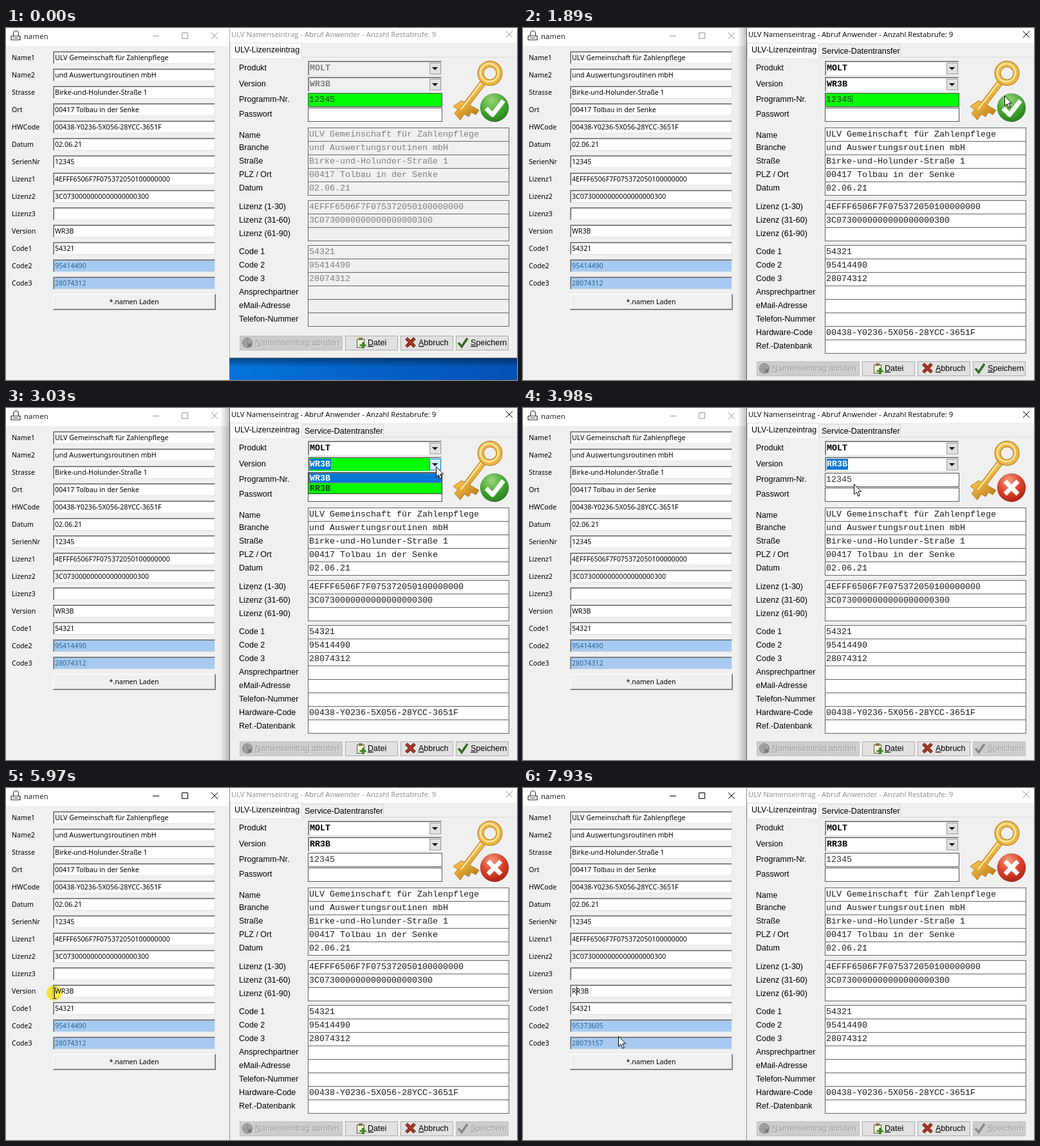
Recreate the animation shown at these times as an HTML page. Size 794 by 548 pixels, loop 8 s.

```html
<!DOCTYPE html>
<html lang="de">
<head>
<meta charset="utf-8">
<title>Lizenzeintrag</title>
<style>
html, body { margin: 0; width: 100%; height: 100%; overflow: hidden; background: #f0f0f0; }
svg { display: block; width: 794px; height: 548px; }
rect, .line { shape-rendering: crispEdges; }
text { white-space: pre; }
.small { font: 10.6px "Noto Sans", sans-serif; }
.title { font: 11.3px "Open Sans", sans-serif; }
.label { font: 12.5px "Liberation Sans", sans-serif; }
.mono { font: 13.333px "Liberation Mono", monospace; }
.bold { font-weight: bold; }
.u { text-decoration: underline; }
.cell { fill: #fff; stroke: #646464; }
.combo { fill: #fff; }
.locked .cell, .locked .combo { fill: #f0f0f0; }
.locked .val { fill: #808080; }
.back .cap { fill: #8c8c8c; }
.back .ctl { stroke: #999; }
.ctl { stroke: #000; fill: none; }
#halo { mix-blend-mode: multiply; }
</style>
</head>
<body>
<svg id="stage" viewBox="0 0 794 548">
  <defs>
    <linearGradient id="desk"><stop stop-color="#0474da"/><stop offset="1" stop-color="#0551b4"/></linearGradient>
    <linearGradient id="drop" x2="0" y2="1"><stop stop-color="#000" stop-opacity=".4"/><stop offset="1" stop-opacity="0"/></linearGradient>
    <linearGradient id="side"><stop stop-color="#000" stop-opacity="0"/><stop offset="1" stop-color="#000" stop-opacity=".24"/></linearGradient>
    <linearGradient id="gold" gradientUnits="userSpaceOnUse" x1="715" y1="70" x2="755" y2="120"><stop stop-color="#ffe9a0"/><stop offset=".5" stop-color="#f0b840"/><stop offset="1" stop-color="#b97a18"/></linearGradient>
    <radialGradient id="green" cx=".4" cy=".25" r=".8"><stop stop-color="#9bd67c"/><stop offset=".55" stop-color="#45a932"/><stop offset="1" stop-color="#237a1c"/></radialGradient>
    <radialGradient id="red" cx=".4" cy=".25" r=".8"><stop stop-color="#f49a80"/><stop offset=".55" stop-color="#dc4028"/><stop offset="1" stop-color="#ac2014"/></radialGradient>
  </defs>
</svg>
<script>
const LOOP = 8000;
const ACTIVATE = 1420, UNLOCK = 1760, OPEN = 2800, HOVER = 3300, CLOSE = 3840,
      PICK = 3980, SWITCH = 5800, MARK = 5980, TYPE = 7450;

const rect = (x, y, w, h, fill, more = '') =>
  `<rect x="${x}" y="${y}" width="${w}" height="${h}" fill="${fill}" ${more}/>`;
const path = (d, stroke, width = 1, more = '') =>
  `<path d="${d}" fill="none" stroke="${stroke}" stroke-width="${width}" ${more}/>`;
const text = (x, y, s, cls, fill = '#000', more = '') =>
  `<text x="${x}" y="${y}" class="${cls}" fill="${fill}" ${more}>${s}</text>`;
// Content shown only from one time to another, pairs of ms
const on = (times, body) => `<g data-on="${times.join(' ')}">${body}</g>`;
const box = (x, y, w, h, fill, stroke, more = '') =>
  rect(x + .5, y + .5, w - 1, h - 1, fill, `stroke="${stroke}" ${more}`);

function sunken(x, y, w, h, fill, cls = '') {
  return rect(x, y, w, h, fill, `class="${cls}"`) +
    path(`M${x + .5} ${y + h}V${y + .5}H${x + w}`, '#a0a0a0', 1, 'class="line"') +
    path(`M${x + 1.5} ${y + h - 1}V${y + 1.5}H${x + w - 1}`, '#696969', 1, 'class="line"') +
    path(`M${x + 1} ${y + h - .5}H${x + w - .5}V${y + 1}`, '#e3e3e3', 1, 'class="line"');
}

const firm = 'ULV Gemeinschaft für Zahlenpflege';
const unit = 'und Auswertungsroutinen mbH';
const street = 'Birke-und-Holunder-Straße 1';
const town = '00417 Tolbau in der Senke';
const hardware = '00438-Y0236-5X056-28YCC-3651F';
const lic1 = '4EFFF6506F7F075372050100000000', lic2 = '3C0730000000000000000300';

function leftWindow() {
  const rows = [['Name1', firm], ['Name2', unit], ['Strasse', street], ['Ort', town],
    ['HWCode', hardware], ['Datum', '02.06.21'], ['SerienNr', '12345'], ['Lizenz1', lic1],
    ['Lizenz2', lic2], ['Lizenz3', ''], ['Version', ['WR3B', 'RR3B']], ['Code1', '54321'],
    ['Code2', ['95414490', '95373605']], ['Code3', ['28074312', '28073157']]];
  let s = rect(0, 0, 347, 548, '#f0f0f0') + rect(0, 0, 347, 28, '#fff') +
    path('M11.5 12V8.500a4 4 0 0 1 8 0V12M8 12.500H22V18.500H8ZM11 15.500H19', '#333', 1.2) +
    text(28, 17, 'namen', 'title', '#111', 'letter-spacing=".15"') +
    '<g id="leftCtl">' + path('M228 12.5H238M273.500 7.500H282.500V16.500H273.500ZM319 7L329 17M329 7L319 17', '#000', 1, 'class="ctl"') + '</g>';
  rows.forEach(([name, value], i) => {
    const y = 36 + 27 * i, code = i > 11, ink = code ? '#2b6496' : '#000';
    s += text(9, y + 14, name, 'small') + sunken(73, y, 252, 20, code ? '#a6caf0' : '#fff');
    const put = v => text(76, y + 14, v, 'small', ink);
    s += Array.isArray(value)
      ? on([0, TYPE], put(value[0])) + on([TYPE, LOOP], put(value[1])) : put(value);
  });
  s += on([MARK, TYPE], rect(76, 309, 11, 14, '#0078d7') + text(76, 320, 'W', 'small', '#fff'));
  s += on([7180, TYPE], rect(76, 309, 1, 14, '#ff8728'));
  s += on([TYPE, 7980], rect(83, 309, 1, 14, '#000'));
  s += rect(73, 414, 253, 25, '#f0f0f0') +
    path('M73.500 438V414.500H325', '#fff', 1, 'class="line"') +
    path('M73 438.500H325.500V414', '#696969', 1, 'class="line"') +
    path('M74 437.500H324.500V415', '#a0a0a0', 1, 'class="line"') +
    text(199, 430, '*.namen Laden', 'small', '#000', 'text-anchor="middle"');
  return s;
}

function cells(top, rows) {
  return rows.map(([name, value], i) => {
    const y = top + 21 * i;
    return text(362, y + (y === 155 ? 16 : 14), name, 'label') +
      rect(469.5, y + .5, 312, 21, '#fff', 'class="cell"') +
      text(471, y + 14, value || '', 'mono val', '#1c1c1c');
  }).join('');
}

function arrowButton(y, hot) {
  return box(658, y, 18, 18, hot ? '#d9ecfb' : '#e1e1e1', hot ? '#0078d7' : '#9a9a9a') +
    `<path d="M662 ${y + 7}H671L666.500 ${y + 11.5}Z"/>`;
}

function keyIcon() {
  const badge = (fill, mark) => `<circle cx="759" cy="124" r="22" fill="url(#${fill})" stroke="#0003"/>` +
    path(mark, '#fff', 7, 'stroke-linejoin="round"');
  return path('M742 84L704 134', '#b07a24', 10) +
    '<path d="M695 122L708 113 735 128 730 135 723 131 719 138 712 134 706 143 697 133 702 127Z" fill="url(#gold)" stroke="#b07a24"/>' +
    path('M742 84L705 133', 'url(#gold)', 8) + path('M738 86L707 127', '#fff0b8', 2) +
    '<circle cx="752" cy="70.500" r="14.500" fill="none" stroke="#b07a24" stroke-width="10"/>' +
    '<circle cx="752" cy="70.500" r="14.500" fill="none" stroke="#eeb746" stroke-width="8"/>' +
    '<circle cx="751" cy="69.500" r="14" fill="none" stroke="#ffe8a0" stroke-width="2.500"/>' +
    on([0, PICK], badge('green', 'M746 125L756 135 773 113')) +
    on([PICK, LOOP], badge('red', 'M749 114L769 134M769 114L749 134'));
}

function buttons() {
  const button = (x, w, tx, s, off) =>
    box(x, 479, w, 23, off ? '#cccccc' : '#e1e1e1', off ? '#bfbfbf' : '#adadad') +
    (off ? text(tx + 1, 495, s, 'label', '#eee') : '') +
    text(tx, 494, s, 'label', off ? '#999' : '#000');
  const key = s => `<tspan class="u">${s[0]}</tspan>${s.slice(1)}`;
  const tick = color => path('M703 490L708 496 717 483', color, 3.500);
  return button(363, 160, 387, key('Namenseintrag abrufen'), true) +
    '<circle cx="375" cy="490" r="7.500" fill="#aaa" stroke="#777"/>' +
    path('M368 490H382M375 483V497M370 486Q375 489 380 486M370 494Q375 491 380 494', '#888') +
    '<circle cx="379" cy="494" r="3" fill="#777"/>' +
    button(527, 82, 562, key('Datei')) +
    box(545, 484, 12, 14, '#f8f5dc', '#5c5238') + rect(548, 482, 6, 4, '#8a7448') +
    path('M554.500 489V499M549.500 494H559.500', '#3f8a28', 3) +
    button(613, 82, 641, key('Abbruch')) +
    path('M622 483L635 496M635 483L622 496', '#5c160c', 5) + path('M622 483L635 496M635 483L622 496', '#b03a22', 3) +
    on([0, PICK], button(699, 82, 722, key('Speichern')) + tick('#2f6a20')) +
    on([PICK, LOOP], button(699, 82, 722, key('Speichern'), true) + tick('#888'));
}

function dropdown() {
  const row = (y, s, hot) => rect(470, y, 207, 16, hot ? '#0078d7' : '#00ff00') +
    (hot ? box(470, y, 207, 16, 'none', '#ff8728', 'stroke-dasharray="1 1"') : '') +
    text(472, y + 12, s, 'mono bold', hot ? '#fff' : '#064006');
  const list = hot => row(101, 'WR3B', hot === 0) + row(117, 'RR3B', hot === 1);
  return on([OPEN, CLOSE], box(469, 100, 209, 34, '#0f0', '#333') +
    on([OPEN, HOVER], list(0)) + on([HOVER, CLOSE], list(1)));
}

function rightWindow() {
  const combo = (y, body) => sunken(469, y, 208, 23, '', 'combo') + body;
  const marked = s => rect(472, 79, 33, 17, '#0078d7') + text(472, 91, s, 'mono bold', '#fff');
  const version = s => text(472, 91, s, 'mono bold val');
  return on([0, UNLOCK], rect(347, 513, 447, 35, 'url(#desk)') + rect(347, 514, 447, 14, 'url(#drop)')) +
    on([0, UNLOCK], rect(347, 0, 447, 514, '#f0f0f0') + rect(347, 513, 447, 1, '#8c8c8c')) +
    on([UNLOCK, LOOP], rect(347, 0, 447, 548, '#f0f0f0')) +
    rect(347, 0, 447, 23, '#fff') +
    on([0, ACTIVATE], rect(347, 0, 1, 514, '#b4b4b4')) +
    on([ACTIVATE, SWITCH], rect(347, 0, 1, 548, '#606060') + rect(333, 0, 14, 548, 'url(#side)')) +
    on([SWITCH, LOOP], rect(347, 0, 1, 548, '#8a8a8a')) +
    text(350, 14, 'ULV Namenseintrag - Abruf Anwender - Anzahl Restabrufe: 9', 'title cap') +
    path('M777 5L787 15M787 5L777 15', '#000', 1, 'class="ctl"') +
    path('M348 45.500H794', '#dcdcdc', 1, 'class="line"') +
    on([UNLOCK, LOOP], box(459, 25, 128, 21, '#f0f0f0', '#d9d9d9') + text(464, 40, 'Service-Datentransfer', 'label')) +
    box(348, 23, 112, 24, '#fff', '#dcdcdc') + rect(349, 45, 110, 2, '#fff') +
    text(355, 38, 'ULV-Lizenzeintrag', 'label') +
    text(362, 66, 'Produkt', 'label') + text(362, 91, 'Version', 'label') +
    text(362, 115, 'Programm-Nr.', 'label') + text(362, 138, 'Passwort', 'label') +
    combo(51, text(472, 66, 'MOLT', 'mono bold val') + arrowButton(54)) +
    combo(76, on([OPEN, PICK], rect(471, 78, 187, 20, '#0f0') + marked('WR3B')) +
      on([0, OPEN], version('WR3B')) + on([PICK, SWITCH], marked('RR3B')) +
      on([SWITCH, LOOP], version('RR3B')) +
      arrowButton(79) + on([2700, 3500], arrowButton(79, true))) +
    box(469, 101, 209, 22, '#fff', '#555') +
    on([0, OPEN], rect(470, 102, 207, 20, '#0f0')) +
    text(471, 115, '12345', 'mono', '#333') +
    on([ACTIVATE, 1950, 2480, OPEN], rect(511, 104, 1, 14, '#0a7a0a')) +
    box(469, 124, 209, 22, '#fff', '#555') +
    keyIcon() +
    cells(155, [['Name', firm], ['Branche', unit], ['Straße', street], ['PLZ / Ort', town], ['Datum', '02.06.21']]) +
    cells(268, [['Lizenz (1-30)', lic1], ['Lizenz (31-60)', lic2], ['Lizenz (61-90)']]) +
    cells(338, [['Code 1', '54321'], ['Code 2', '95414490'], ['Code 3', '28074312'],
      ['Ansprechpartner'], ['eMail-Adresse'], ['Telefon-Nummer']]) +
    on([UNLOCK, LOOP], cells(464, [['Hardware-Code', hardware], ['Ref.-Datenbank']])) +
    `<g id="buttons">${buttons()}</g>` + dropdown();
}

const beam = 'M-2.500 -8H-1L.5 -7 2 -8H3.500M.5 -7V8M-2.500 9H-1L.5 8 2 9H3.500';
const stage = document.getElementById('stage');
stage.insertAdjacentHTML('beforeend',
  `<g id="left">${leftWindow()}</g><g id="right">${rightWindow()}</g>` +
  on([ACTIVATE, 1600, 2700, 2900, 3430, CLOSE, SWITCH, 6650], '<circle id="halo" r="12" fill="#fff23c"/>') +
  '<g id="cursor">' +
  on([130, 4380, 5300, 5590, 6650, LOOP],
    '<path d="M.5 .5V16.500L4.200 13 6.800 19.300 9.300 18.300 6.700 12H11.500Z" fill="#fff" stroke="#000"/>') +
  on([4380, 5300, 5590, 6650], path(beam, '#fff', 2.600) + path(beam, '#000', 1.100)) +
  '</g>');

// Pointer route: time, x, y
const route = [[130, 744, 430], [200, 722, 250], [260, 721, 118], [530, 723, 117], [740, 758, 105],
  [1700, 758, 105], [1890, 748, 105], [2160, 680, 99], [2230, 679, 98], [2360, 679, 98],
  [2430, 677, 97], [2600, 677, 96], [2700, 671, 89], [3030, 669, 91], [3300, 530, 125],
  [3430, 514, 118], [4100, 514, 118], [4490, 262, 241], [4560, 262, 241], [5090, 84, 208],
  [5360, 84, 387], [5440, 84, 387], [5750, 84, 319], [5900, 84, 319], [6240, 42, 320],
  [6450, 56, 321], [7320, 56, 321], [7740, 148, 385], [7930, 148, 386]];

function pointAt(t) {
  const i = route.findIndex(p => p[0] > t);
  if (i === 0) return route[0].slice(1);
  if (i < 0) return route[route.length - 1].slice(1);
  const [a, b] = [route[i - 1], route[i]], k = (t - a[0]) / (b[0] - a[0]);
  return [1, 2].map(n => Math.round(a[n] + (b[n] - a[n]) * k));
}

const byId = id => document.getElementById(id);
const parts = [...stage.querySelectorAll('[data-on]')].map(node => ({ node, times: node.dataset.on.split(' ').map(Number) }));

function draw(t) {
  for (const { node, times } of parts) {
    const shown = times.some((from, i) => i % 2 === 0 && t >= from && t < times[i + 1]);
    node.style.display = shown ? '' : 'none';
  }
  byId('right').classList.toggle('locked', t < UNLOCK);
  byId('right').classList.toggle('back', t < ACTIVATE || t >= SWITCH);
  byId('leftCtl').classList.toggle('back', t < SWITCH);
  byId('buttons').setAttribute('transform', `translate(0 ${t < UNLOCK ? 0 : 40})`);
  const [x, y] = pointAt(t);
  byId('cursor').setAttribute('transform', `translate(${x} ${y})`);
  byId('halo').setAttribute('cx', x);
  byId('halo').setAttribute('cy', y);
}

const start = performance.now();
function tick() {
  draw((performance.now() - start) % LOOP);
  requestAnimationFrame(tick);
}
tick();
</script>
</body>
</html>
```
